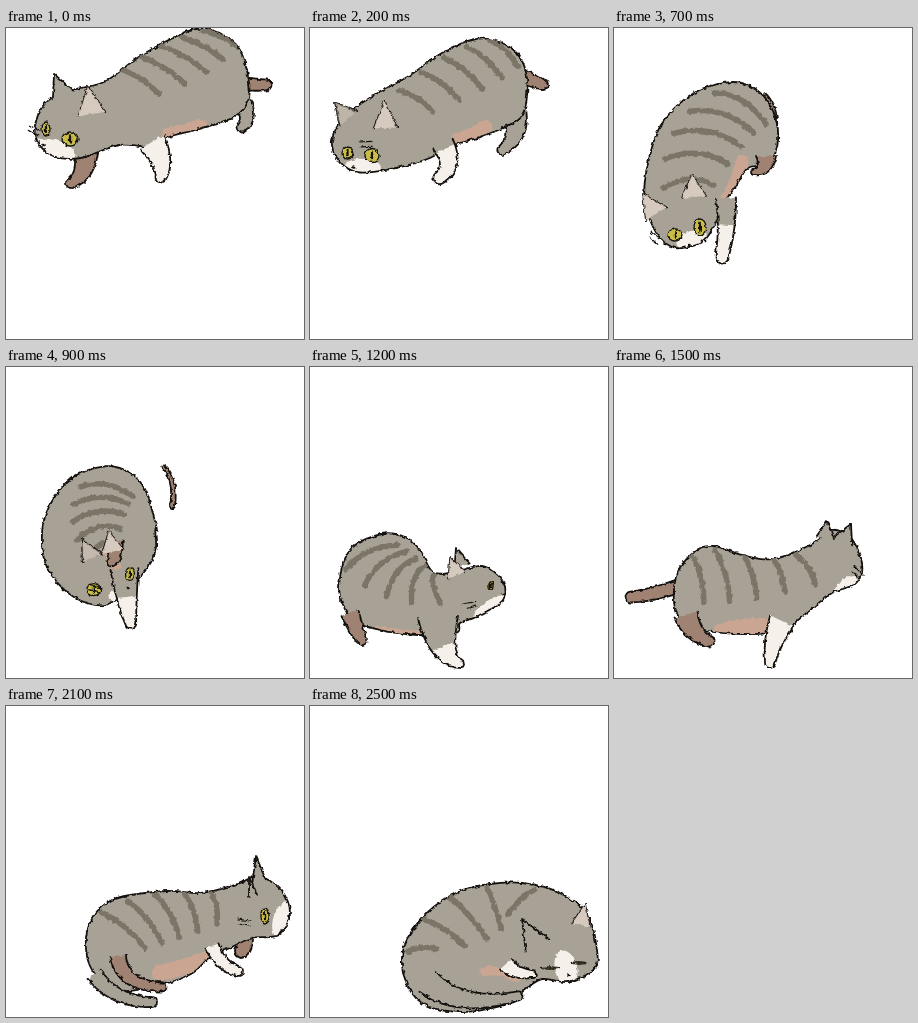
Recreate the animation shown at these times as an HTML page. Size 298x311 px, loop 2.6 s.

```html
<!DOCTYPE html>
<html lang="en">
<head>
<meta charset="utf-8">
<title>Cat lies down</title>
<style>
html, body { margin: 0; width: 100%; height: 100%; overflow: hidden; background: #fff; }
svg { display: block; width: 100%; height: 100%; }
</style>
</head>
<body>
<svg viewBox="0 0 298 311" stroke-linecap="round" stroke-linejoin="round">
  <filter id="rough" filterUnits="userSpaceOnUse" x="0" y="0" width="298" height="311" color-interpolation-filters="sRGB">
    <feTurbulence type="fractalNoise" baseFrequency="0.22" numOctaves="2" seed="4" result="noise"/>
    <feDisplacementMap in="SourceGraphic" in2="noise" scale="4" xChannelSelector="R" yChannelSelector="G"/>
  </filter>
  <g id="cat" filter="url(#rough)"></g>
</svg>
<script>
const STEP = 100, STEPS = 26, STRIPES = 5;
const INK = '#14110f', FUR = '#a7a295', BROWN = '#a08272', PINK = '#c9a592',
  CREAM = '#f6f0eb', STRIPE = '#7b7568', YELLOW = '#c9bd46';

// body: outline points, clockwise from the top
// limbs: start, bend and end point, start and end width, where the white sock starts
// stripes: curve along the back, curve along the flank, bend of each stripe
// belly: curve and width; muzzle: ellipse and tilt; ears: tip, base, width, inner tint
// eyes: center and radii; whisker: place and angle
const POSES = [
  { at: 0,
    body: '190 1 225 12 239 35 243 70 228 89 193 101 163 109 148 119 113 117 75 130 45 127 29 107 36 79 58 64 98 54 136 27',
    tail: '240 56 252 57 260 57 13 11', hind: '237 75 245 90 236 99 17 11',
    far: '80 124 80 148 65 155 24 10', front: '146 114 159 135 155 149 28 11 0',
    stripes: '197 3 155 14 115 41 229 17 210 47 153 66 3 -4',
    belly: '162 107 178 104 194 98 14', muzzle: '48 122 22 10 15', nose: '38 117',
    earL: '48 46 57 67 22 0', earR: '82 58 86 86 27 1',
    eyeL: '40 101 4 7', eyeR: '64 111 8 7', whisker: '23 97 30' },
  { at: 4,
    body: '150 20 180 30 194 58 184 100 160 110 132 122 112 129 92 141 58 163 25 159 14 140 15 118 36 95 76 67 100 42 128 23',
    tail: '188 42 198 50 206 57 16 9', hind: '172 98 176 130 148 145 32 8',
    front: '120 118 132 142 104 151 16 14 .2',
    stripes: '162 20 112 30 62 84 186 60 150 75 92 101 5 -6',
    belly: '130 119 145 111 158 99 12', muzzle: '57 158 15 9 -15', nose: '50 162',
    earL: '2 103 20 114 24 1', earR: '67 88 65 114 20 1',
    eyeL: '35 149 7 5', eyeR: '60 144 6 7', whisker: '75 131 -35' },
  { at: 7,
    body: '119 54 144 63 159 83 164 112 155 135 134 140 122 158 112 172 100 198 88 214 62 220 43 206 31 174 33 140 47 97 80 65',
    tail: '150 66 164 80 160 106 3 5', haunch: '152 128 152 143 140 144 20 6',
    front: '112 170 114 200 108 229 20 13 .45',
    stripes: '100 65 45 98 49 160 152 96 128 110 100 158 4 -16',
    belly: '128 133 124 150 112 172 12', muzzle: '78 212 16 9 -15', nose: '75 217',
    earL: '29 166 42 186 24 1', earR: '78 147 80 169 24 1',
    eyeL: '61 207 7 6', eyeR: '86 199 6 8', whisker: '37 204 40' },
  { at: 12,
    body: '72 167 95 170 110 183 123 205 145 205 172 199 192 213 193 233 166 250 150 256 146 266 108 268 70 263 42 252 29 222 40 183',
    haunch: '40 246 48 268 52 273 18 10', front: '128 250 130 290 150 297 40 8 .45',
    stripes: '36 202 70 240 130 236 88 178 105 190 124 208 -8 -10',
    belly: '68 264 88 268 108 269 10', muzzle: '180 241 20 7 -35', nose: '193 227',
    earL: '146 181 152 199 16 0', earR: '140 191 147 208 18 1',
    eyeR: '181 219 2 4', whisker: '153 237 -12' },
  { at: 15,
    body: '100 179 128 188 160 192 200 176 216 163 236 170 248 196 243 216 218 226 190 248 168 264 130 267 90 263 63 246 62 210 80 185',
    tail: '68 218 40 228 17 230 14 11', haunch: '72 248 78 268 95 274 24 11',
    front: '168 254 158 275 156 296 26 10 0',
    stripes: '78 188 122 174 182 188 90 235 140 236 201 217 6 -3',
    belly: '108 264 130 258 150 259 16', muzzle: '232 218 13 6 -35',
    earL: '213 154 211 171 18 0', earR: '237 157 229 174 20 0', whisker: '240 199 45' },
  { at: 21,
    body: '160 185 195 187 232 178 252 170 275 184 284 207 272 229 246 232 224 242 205 250 185 268 150 280 110 284 84 260 82 222 106 194',
    curl: '88 268 108 296 146 296 16 10', haunch: '112 250 116 280 156 281 16 9',
    far: '238 226 240 240 236 245 18 14', front: '206 240 214 260 232 265 14 10 0',
    stripes: '95 206 148 180 205 187 139 242 172 232 211 219 5 -5',
    belly: '154 267 180 261 204 252 16', muzzle: '276 214 9 18 15', nose: '283 210',
    earL: '243 171 247 190 8 0', earR: '250 150 253 174 13 0',
    eyeR: '259 210 4 8', whisker: '232 213 10' },
  { at: 25,
    body: '180 178 212 177 248 186 277 208 287 244 284 263 258 276 232 273 212 286 195 299 150 306 112 297 94 270 95 238 118 206 148 186',
    curl: '118 276 150 304 208 290 26 9', front: '196 258 205 268 222 268 16 8 0',
    stripes: '97 246 120 168 224 184 126 243 192 240 198 208 0 -6',
    belly: '174 266 188 262 206 272 9', muzzle: '256 262 11 18 -15', nose: '259 269',
    earL: '212 213 227 239 26 0', earR: '275 198 271 219 18 1',
    eyeL: '240 262 9 1', eyeR: '269 257 7 1' }
].map(pose => Object.fromEntries(Object.entries(pose).map(
  ([name, v]) => [name, name === 'at' ? v : v.split(' ').map(Number)])));

const cat = document.getElementById('cat');
const mix = (a, b, k) => a.map((v, i) => v + (b[i] - v) * k);
const bend = (a, b, c, t) => a * (1 - t) ** 2 + 2 * b * t * (1 - t) + c * t * t;
const onCurve = ([ax, ay, bx, by, cx, cy], t) => [bend(ax, bx, cx, t), bend(ay, by, cy, t)];

function tag(name, attrs) {
  return `<${name} ${Object.entries(attrs).map(([k, v]) => `${k}="${v}"`).join(' ')}/>`;
}
const shape = (d, fill, ink = 'none', width = 1.8) =>
  tag('path', { d, fill, stroke: ink, 'stroke-width': width });

// Closed Catmull-Rom curve
function outline(list) {
  const n = list.length / 2;
  const at = i => list.slice((i + n) % n * 2, (i + n) % n * 2 + 2);
  let d = 'M' + at(0);
  for (let i = 0; i < n; i++) {
    const [a, b, c, e] = [at(i - 1), at(i), at(i + 1), at(i + 2)];
    d += `C${b.map((v, j) => v + (c[j] - a[j]) / 6)} ${c.map((v, j) => v - (e[j] - b[j]) / 6)} ${c}`;
  }
  return d + 'Z';
}

// Tapered tube around a curve, open at its start, with a round tip
function tube(v, from = 0) {
  const left = [], right = [], parts = 12;
  for (let i = 0; i <= parts; i++) {
    const t = from + (1 - from) * i / parts;
    const [x, y] = onCurve(v, t);
    const dx = (1 - t) * (v[2] - v[0]) + t * (v[4] - v[2]);
    const dy = (1 - t) * (v[3] - v[1]) + t * (v[5] - v[3]);
    const r = (v[6] + (v[7] - v[6]) * t) / 2 / Math.hypot(dx, dy);
    left.push([x + dy * r, y - dx * r]);
    right.unshift([x - dy * r, y + dx * r]);
  }
  const tip = v[7] / 2;
  return `M${left.join('L')}A${tip} ${tip} 0 0 1 ${right.join('L')}`;
}

const limb = fill => v => shape(tube(v), fill, INK);

function sockedLimb(v) {
  return shape(tube(v), FUR) + shape(tube(v, v[8]), CREAM) + shape(tube(v), 'none', INK);
}

function stripes(v) {
  let html = '';
  for (let i = 0; i < STRIPES; i++) {
    const t = i / (STRIPES - 1);
    const a = onCurve(v.slice(0, 6), t), b = onCurve(v.slice(6, 12), t);
    const mid = mix(a, b, 0.5).map((p, j) => p + v[12 + j]);
    html += shape(`M${a}Q${mid} ${b}`, 'none', STRIPE, 5.5);
  }
  return html;
}

function ear([tx, ty, bx, by, width, inner]) {
  const r = width / 2 / Math.hypot(tx - bx, ty - by);
  const ox = (by - ty) * r, oy = (tx - bx) * r;
  const d = `M${bx - ox} ${by - oy}L${tx} ${ty}L${bx + ox} ${by + oy}`;
  return shape(d, FUR, INK) +
    tag('path', { d, fill: '#dccdc2', 'fill-opacity': inner * 0.9 });
}

function eye([cx, cy, rx, ry]) {
  return tag('ellipse', { cx, cy, rx, ry, fill: YELLOW, stroke: INK, 'stroke-width': 1.3 }) +
    tag('ellipse', { cx, cy, rx: 1.2, ry: ry * 0.7, fill: INK });
}

function whisker([x, y, angle]) {
  const lines = tag('path', { d: 'M0 0h13M2 5h11', fill: 'none', stroke: INK, 'stroke-width': 1.2 });
  return `<g transform="translate(${x} ${y}) rotate(${angle})">${lines}</g>`;
}

function muzzle([cx, cy, rx, ry, tilt]) {
  return tag('ellipse', { cx, cy, rx, ry, fill: CREAM, transform: `rotate(${tilt} ${cx} ${cy})` });
}

const onBody = html => `<g clip-path="url(#fur)">${html}</g>`;

// Paint order
const PAINT = {
  tail: limb(BROWN),
  far: limb(BROWN),
  hind: limb(FUR),
  body: v => `<clipPath id="fur"><path d="${outline(v)}"/></clipPath>` + shape(outline(v), FUR),
  belly: v => onBody(shape(`M${v.slice(0, 2)}Q${v.slice(2, 6)}`, 'none', PINK, v[6])),
  muzzle: v => onBody(muzzle(v)),
  edge: v => shape(outline(v), 'none', INK),
  haunch: limb(BROWN),
  curl: limb(FUR),
  front: sockedLimb,
  stripes: v => onBody(stripes(v)),
  earL: ear, earR: ear, eyeL: eye, eyeR: eye,
  nose: ([cx, cy]) => tag('ellipse', { cx, cy, rx: 1.8, ry: 1.3, fill: INK }),
  whisker
};
for (const pose of POSES) pose.edge = pose.body;

const HEAD = ['earL', 'eyeL', 'eyeR', 'nose', 'whisker'];
const headAt = pose => pose.earR.slice(2, 4);
const middle = ({ body }) => [0, 1].map(j =>
  body.reduce((sum, v, i) => i % 2 === j ? sum + v : sum, 0) * 2 / body.length);

function draw(step) {
  const i = POSES.findLastIndex(pose => pose.at <= step);
  const a = POSES[i], b = POSES[i + 1] || a;
  const k = a === b ? 0 : (step - a.at) / (b.at - a.at);
  const near = k < 0.5 ? a : b;
  let html = '';
  for (const [name, paint] of Object.entries(PAINT)) {
    if (a[name] && b[name]) {
      html += paint(mix(a[name], b[name], k));
    } else if (near[name]) {
      // A part that one pose hides follows the head or the trunk
      const anchor = HEAD.includes(name) ? headAt : middle;
      const from = anchor(near);
      const move = mix(anchor(a), anchor(b), k).map((v, j) => v - from[j]);
      html += `<g transform="translate(${move})">${paint(near[name])}</g>`;
    }
  }
  cat.innerHTML = html;
}

let shown = -1;
const start = performance.now();
function tick(now) {
  const step = Math.floor(Math.max(0, now - start) / STEP) % STEPS;
  if (step !== shown) draw(shown = step);
  requestAnimationFrame(tick);
}
tick(start);
</script>
</body>
</html>
```
